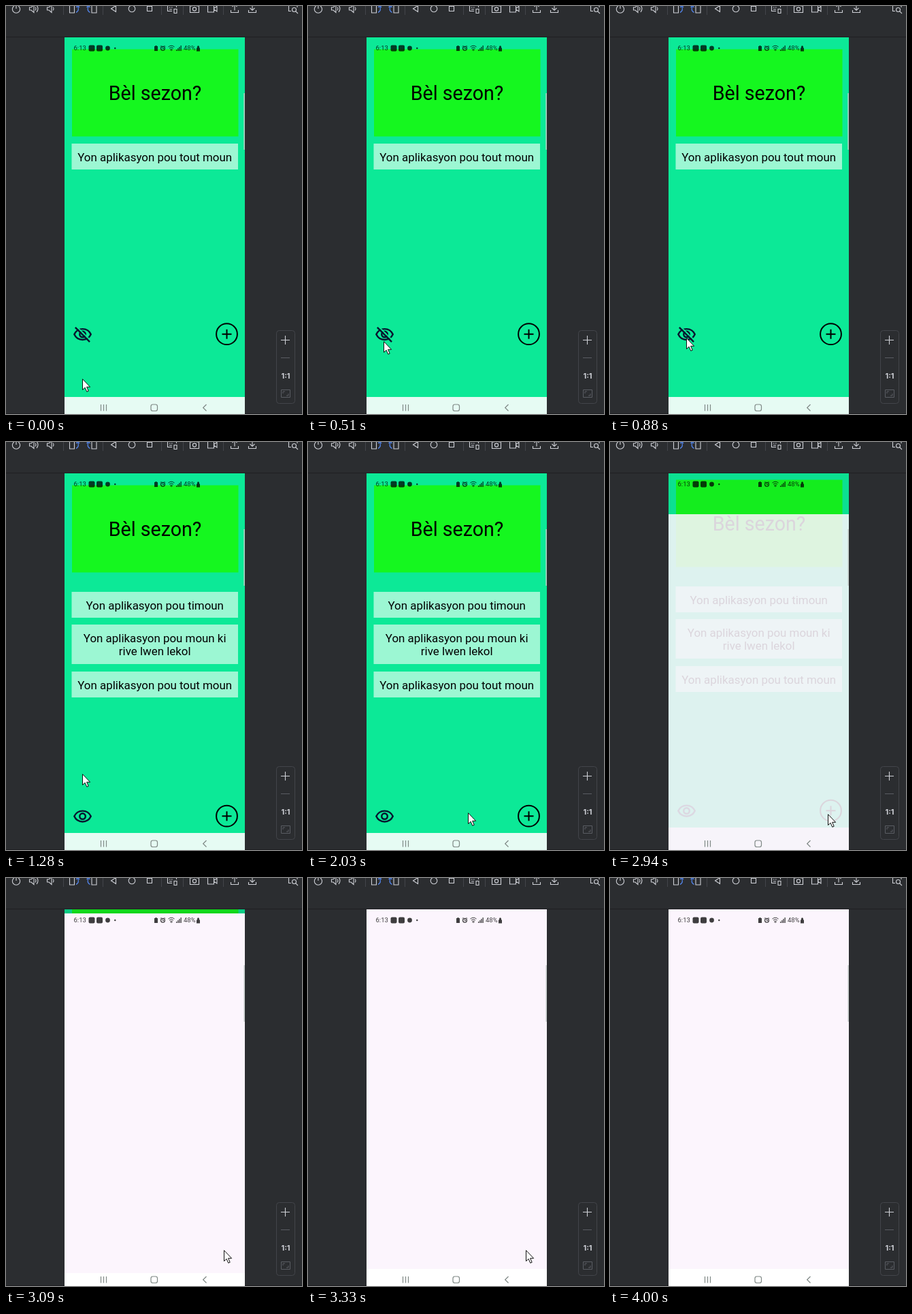
An HTML page that plays this animation: 435x599 px, repeating every 4.8 s.

```html
<!DOCTYPE html>
<html lang="ht">
<head>
<meta charset="utf-8">
<title>Phone mirror</title>
<style>
html, body { margin: 0; width: 100%; height: 100%; overflow: hidden; background: #2b2d30; }
svg { display: block; width: 100%; height: 100%; }
text { font-family: Roboto, sans-serif; }
.mid { text-anchor: middle; }
.line { fill: none; stroke: #ced0d6; stroke-width: 1.1; }
.sep { stroke: #43454a; }
.dim { fill: none; stroke: #5a5d63; }
.blue { stroke: #548af7; }
.ink { fill: none; stroke: #08162f; stroke-width: 2; }
.plus { fill: none; stroke: #000; stroke-width: 2; }
</style>
</head>
<body>
<svg viewBox="0 0 435 599">
  <defs>
    <clipPath id="screen"><rect x="86" y="46" width="265" height="553"/></clipPath>
    <path id="eye" d="M2 12C3.8 8 7.6 5.5 12 5.5S20.2 8 22 12C20.2 16 16.4 18.5 12 18.5S3.8 16 2 12zM8.5 12a3.5 3.5 0 0 1 7 0a3.5 3.5 0 0 1 -7 0z"/>
  </defs>
  <rect width="435" height="599" fill="#2b2d30"/>
  <path d="M0 45.5H435M0 598.5H435" stroke="#1e1f22"/>

  <!-- toolbar -->
  <path class="sep" d="M84.5 0V13M142.5 0V13M228.5 0V13M260.5 0V13M319.5 0V13"/>
  <g class="line">
    <path d="M11.8 0A5.6 5.6 0 1 0 18.2 0M15 -2V4"/>
    <path d="M34.5 2H37L41 -1.5V9.5L37 6H34.5zM43 1.5Q45 4 43 6.5M45 -1Q49 4 45 9"/>
    <path d="M60.500 2H63L67 -1.5V9.5L63 6H60.500zM69 1.500Q71 4 69 6.500"/>
    <path d="M93.500 -2H100.500V10H93.500zM133 -2H126V10H133z"/>
    <path class="blue" d="M103 9.500Q108 7 105.500 1M103 2L105.500 -.5L108 2M123.500 9.500Q118.500 7 121 1M118.500 2L121 -.5L123.500 2"/>
    <path d="M161.500 -.5V8.500L154.500 4zM207.500 .5H214.500V7.500H207.500z"/>
    <circle cx="185" cy="4" r="4.800"/>
    <path d="M244 7.500H237.500V-1H250.500V2M240 2H241.500M243 2H244.500M240 5H244M247 4.500H251V10.500H247z"/>
    <path d="M270.500 0H273.500L275 -2H279L280.500 0H283.500V9.500H270.500z"/>
    <circle cx="277" cy="4.500" r="2.600"/>
    <path d="M296.500 -.5H305.500V9H296.500zM305.500 3.500L310 .5V8L305.500 5"/>
    <path d="M330.500 6V9.500H341.500V6M336 6.500V-2M332.500 1L336 -2L339.500 1"/>
    <path d="M356.500 6V9.500H367.500V6M362 -2V6M358.500 3L362 6.300L365.500 3"/>
    <path d="M419 7.500H415.500V-1H428V2M425.800 7.800L429 11"/>
    <circle cx="423.500" cy="5.500" r="3"/>
  </g>

  <!-- zoom panel -->
  <rect class="dim" x="397.500" y="476.500" width="27" height="107" rx="4" style="stroke:#43454a"/>
  <path class="line" d="M404 490.500H417M410.500 484V497"/>
  <path class="dim" d="M404 516.500H417M404.500 563.500H417.500V574.500H404.500zM407 569V566H410M412 572H415V569"/>
  <text class="mid" x="411" y="547" fill="#ced0d6" font-size="11" font-weight="700" style="font-family:Inter,sans-serif">1:1</text>

  <g clip-path="url(#screen)">
    <g id="page">
      <rect x="86" y="0" width="265" height="680" fill="#0ce997"/>
      <rect x="97" y="63.500" width="244.500" height="128" fill="#15f71f"/>
      <text class="mid" x="219" y="138" font-size="28.600">Bèl sezon?</text>
      <g id="cards"></g>
      <g id="buttons">
        <g transform="translate(97.900 467.400) scale(1.220)">
          <use href="#eye" class="ink"/>
          <g id="slash">
            <path d="M4.800 2.600L22.300 20.100" stroke="#0ce997" stroke-width="1.600"/>
            <path class="ink" d="M3.200 3.600L20.600 21"/>
          </g>
        </g>
        <circle class="plus" cx="324.500" cy="481.700" r="15.400"/>
        <path class="plus" d="M317.500 481.700H331.500M324.500 474.700V488.700"/>
      </g>
      <rect x="86" y="574" width="265" height="80" fill="#e6fbf3"/>
    </g>
    <rect id="shade" x="86" y="46" width="265" height="553"/>
    <g id="sheet">
      <rect x="86" y="46" width="265" height="553" fill="#fcf5fd"/>
      <rect id="sheetNav" x="86" y="574" width="265" height="25" fill="#fff"/>
    </g>

    <!-- system bars -->
    <g fill="#000" opacity=".75" font-size="9.500">
      <text x="99.500" y="65.300">6:13</text>
      <rect x="121.500" y="57.500" width="9" height="9" rx="2"/>
      <rect x="133" y="57.500" width="9" height="9" rx="2"/>
      <circle cx="149.500" cy="62" r="3.400"/>
      <circle cx="160.300" cy="62" r="1.200"/>
      <path d="M218 59H219.500V58H221.500V59H223V66H218zM250 66V64H251.300V66zM252.200 66V62H253.500V66zM254.300 66V60H255.600V66zM256.500 66V58H257.800V66z"/>
      <circle cx="230.500" cy="62.300" r="2.900" fill="none" stroke="#000" stroke-width="1.300"/>
      <path d="M230.500 60.500V62.500H232M227 59.500L228.500 58M234 59.500L232.500 58M238.500 60Q243 56.500 247.500 60M240 62Q243 59.800 246 62M241.500 64Q243 63 244.500 64L243 65.700z" fill="none" stroke="#000"/>
      <text x="261" y="65.300">48%</text>
      <path d="M280 61.500H281V59.500Q282.500 57 284 59.500V61.500H285V66.500H280z"/>
    </g>
    <rect x="349.300" y="128" width="1.700" height="83" fill="#c6cdca" opacity=".85"/>
    <g fill="none" stroke="#7f8885" stroke-width="1.200">
      <path d="M139.500 585V594.500M143.500 585V594.500M147.500 585V594.500M294.500 585L289.700 589.700L294.500 594.500"/>
      <rect x="213" y="585" width="9.500" height="9.500" rx="2.800"/>
    </g>
  </g>
  <path id="cursor" d="M.5 .7V16.500L4.100 13.200L6.800 19.300L9.200 18.200L6.600 12.300H11.600z" fill="#fff" stroke="#111" stroke-width="1"/>
</svg>
<script>
const LOOP = 4800;
const OPENED = 1280;
const $ = id => document.getElementById(id);

// [time, x, y]: the pointer jumps at each time
const pointer = [
  [0, 112, 547], [120, 112, 534], [240, 111, 513], [360, 110, 499],
  [510, 111, 492], [630, 112, 487],
  [1760, 139, 511], [1880, 190, 539],
  [2030, 235, 544], [2150, 268, 544], [2270, 290, 544],
  [2550, 308, 569], [2670, 316, 556], [2790, 320, 546],
  [3730, 345, 567], [3850, 368, 586], [4000, 450, 620]
];

// [time, page shift, shade, sheet offset, sheet opacity]
const slide = [
  [0, 0, 0, 0, 0], [2940, -8, .04, 60, .87],
  [3090, -24, .13, 6, 1], [3210, -24, .14, 2, 1], [3330, -24, 0, 0, 1]
];

const everyone = 'Yon aplikasyon pou tout moun';
const closedCards = [[202, everyone]];
const openCards = [
  [220, 'Yon aplikasyon pou timoun'],
  [268, 'Yon aplikasyon pou moun ki', 'rive lwen lekol'],
  [337, everyone]
];

function card([y, ...lines]) {
  const height = 18 + 20 * lines.length;
  const text = lines.map((s, i) =>
    `<text class="mid" x="218.700" y="${y + 25.500 + i * 19.800}" font-size="16.900">${s}</text>`);
  return `<rect x="96.500" y="${y}" width="244.500" height="${height}" fill="#9cf7d3"/>` + text.join('');
}

const at = (steps, t) => steps.filter(s => s[0] <= t).pop();
const move = (id, x, y) => $(id).setAttribute('transform', `translate(${x} ${y})`);

let shown = null;
function showCards(open) {
  if (open === shown) return;
  shown = open;
  $('cards').innerHTML = (open ? openCards : closedCards).map(card).join('');
  $('slash').style.display = open ? 'none' : '';
  move('buttons', 0, open ? 67.500 : 0);
}

function draw(t) {
  const [, x, y] = at(pointer, t);
  const [, shift, shade, offset, alpha] = at(slide, t);
  showCards(t >= OPENED);
  move('cursor', x, y);
  move('page', 0, shift);
  $('shade').setAttribute('opacity', shade);
  move('sheet', 0, offset);
  $('sheet').setAttribute('opacity', alpha);
}

const start = performance.now();
function tick() {
  draw((performance.now() - start) % LOOP);
  requestAnimationFrame(tick);
}
tick();
</script>
</body>
</html>
```
